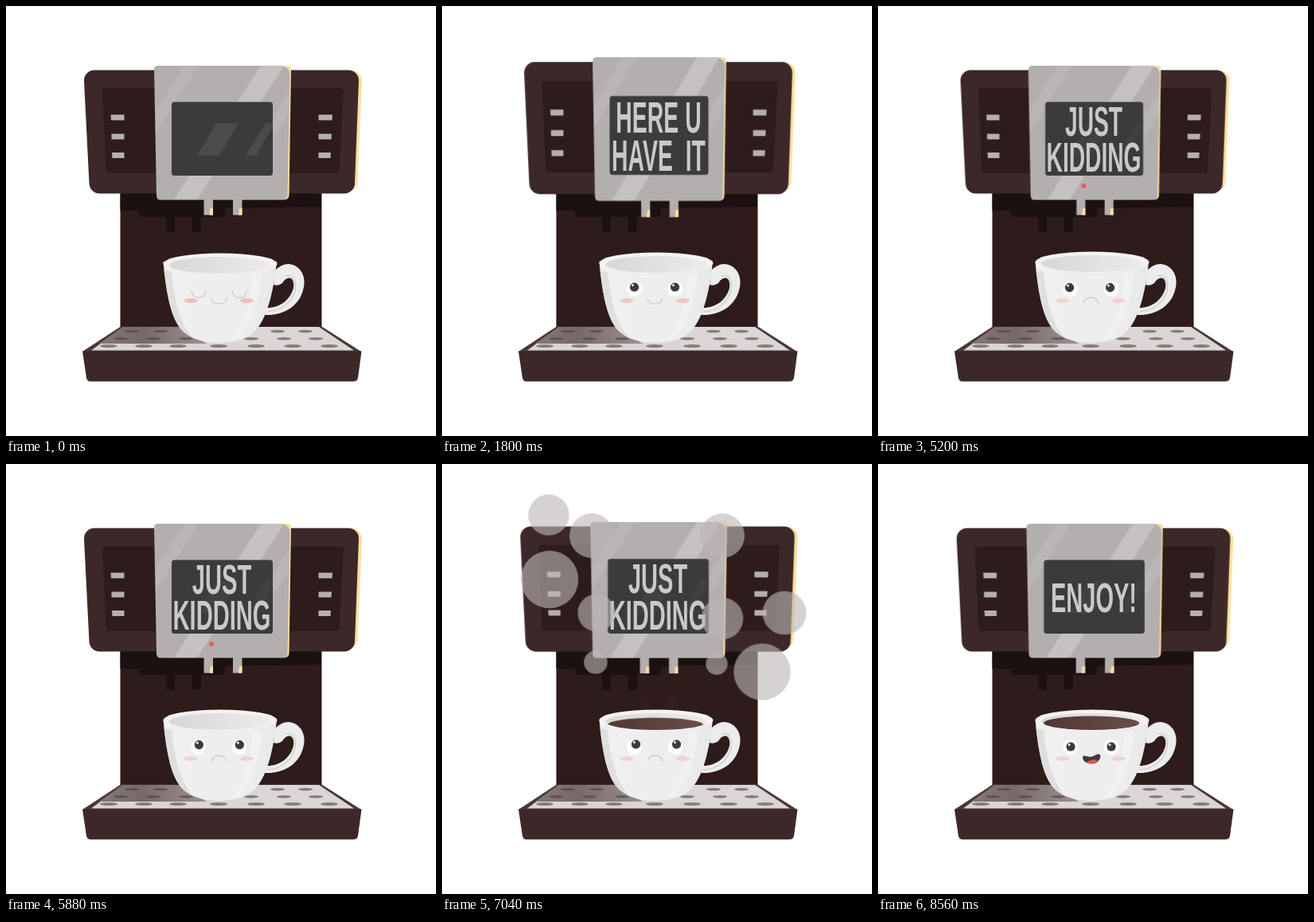
Write an HTML page without scripts that moves like this. It is 540 px wide and 540 px high and loops after 8640 ms.

```html
<!DOCTYPE html>
<html lang="en">
<head>
<meta charset="utf-8">
<title>Coffee machine</title>
<style>
html, body { margin: 0; width: 100%; height: 100%; overflow: hidden; background: #fff; }
svg { display: block; width: 100%; height: 100%; }

.anim, .cut { animation: 8.64s ease-in-out infinite; }
.cut { animation-timing-function: step-end; }
.own { transform-box: fill-box; transform-origin: center; }

.text { font: bold 52px "Liberation Sans", Arial, sans-serif; fill: #c9c9c9; text-anchor: middle; }
.line { fill: none; stroke: #cfcfcf; stroke-width: 1.5; stroke-linecap: round; }
.key { fill: #b5b0af; }
.metal { fill: #b3afae; }
.gold { fill: #ffdf9e; }
.shine { fill: #c5c1c0; }
.faint { opacity: .4; }
.dark { fill: #2d1c1b; }
.brown { fill: #3c2829; }
.ink { fill: #3b3b3b; }
.red { fill: #e6544e; }

#head { transform-origin: 272px 226px; animation-name: head; }
@keyframes head {
  0%, 1.85%, 11.5% { transform: none; }
  6.8% { transform: scale(.97, 1); }
  14% { transform: scale(.985, 1); }
  18.3% { transform: translateX(1px) scale(.972, 1.085); }
  20.83% { transform: translateX(1px) scale(.976, 1.071); }
  25.5% { transform: none; }
  29% { transform: scale(.975, 1); }
  32.4% { transform: scale(.994, 1); }
  36%, 52.6% { transform: none; }
  60.19% { transform: scale(.968, 1); }
  67%, 73.1% { transform: none; }
  75.46% { transform: translateX(1px) scale(.971, 1.22); }
  76.6% { transform: translateX(1px) scale(.97, 1.235); }
  82.5% { transform: none; }
  87.04%, 99.07% { transform: scale(.996, 1); }
  100% { transform: none; }
}

#here { animation-name: here; }
@keyframes here { 0%, 53.2% { opacity: 0 } 13.4%, 53.1% { opacity: 1 } }
#just { animation-name: just; }
@keyframes just { 0%, 82.4% { opacity: 0 } 53.2% { opacity: 1 } }
#enjoy { animation-name: enjoy; }
@keyframes enjoy { 0% { opacity: 0 } 82.4% { opacity: 1 } }
#glare { animation-name: glare; }
@keyframes glare { 0% { opacity: 1 } 13.4% { opacity: .15 } 53.2% { opacity: .4 } }
#lamp { animation-name: lamp; }
@keyframes lamp { 0%, 62.5%, 71.8% { opacity: 0 } 57.9%, 67.1% { opacity: 1 } }

#asleep { animation-name: asleep; }
@keyframes asleep { 0% { opacity: 1 } 6.5% { opacity: 0 } }
#awake { animation-name: awake; }
@keyframes awake { 0% { opacity: 0 } 6.5% { opacity: 1 } }
#smile { animation-name: smile; }
@keyframes smile { 0% { opacity: 1 } 33.6% { opacity: 0 } }
#worry { animation-name: worry; }
@keyframes worry { 0%, 45% { opacity: 0 } 33.6% { opacity: 1 } }
#frown { animation-name: frown; }
@keyframes frown { 0%, 83% { opacity: 0 } 45% { opacity: 1 } }
#grin { animation-name: grin; }
@keyframes grin { 0% { opacity: 0 } 83% { opacity: 1 } }
#cheeks { animation-name: cheeks; }
@keyframes cheeks { 0%, 2% { opacity: 1 } 21% { opacity: .8 } 36%, 99.9% { opacity: .55 } }

#pupils { animation-name: look; }
@keyframes look {
  0%, 22% { transform: none; }
  36%, 52% { transform: translate(1px, 0); }
  58%, 63% { transform: translate(-1px, .5px); }
  72%, 89% { transform: translate(2px, -1px); }
  95%, 100% { transform: translate(.5px, 2px); }
}
.pupil { animation-name: widen; }
@keyframes widen { 0%, 90% { transform: none; } 95%, 100% { transform: scale(1.42); } }
.spark { animation-name: spark; }
@keyframes spark { 0%, 90% { opacity: 0 } 95%, 100% { opacity: 1 } }

#rim { animation-name: rim; }
@keyframes rim { 0%, 2% { transform: translateY(2px); } 21% { transform: translateY(1px); } 36%, 99.9% { transform: none; } }
#coffee { animation-name: fill; }
@keyframes fill { 0%, 77% { transform: translateY(16px); opacity: 0; } 77.1% { opacity: 1; } 83%, 99.99% { transform: none; opacity: 1; } }
#steam { animation-name: steam; }
@keyframes steam { 0%, 83% { opacity: 0 } 87%, 90% { opacity: .5 } 98%, 100% { opacity: 0 } }

#drips { transform-origin: 272px 266px; animation-name: drips; }
@keyframes drips {
  0%, 73.5% { transform: scaleY(0); opacity: 0; }
  74%, 79% { opacity: 1; }
  75.46%, 78% { transform: none; }
  82%, 100% { transform: translateY(24px); opacity: 0; }
}

#smoke { animation-name: smoke; fill: #bbb7b5; }
@keyframes smoke {
  0%, 78.5% { opacity: 0; }
  80.5%, 88% { opacity: .62; transform: none; }
  93.2%, 100% { opacity: 0; transform: translateY(-17px); }
}
#smoke circle { animation-name: swell; }
@keyframes swell { 0%, 78.5% { transform: scale(.1); } 84.5%, 100% { transform: none; } }
#puff { animation-name: puff; fill: #bbb7b5; }
@keyframes puff { 0%, 24% { opacity: 0 } 29% { opacity: .4 } 36% { opacity: .04 } 40%, 100% { opacity: 0 } }
</style>
</head>
<body>
<svg viewBox="0 0 540 540">
  <defs>
    <linearGradient id="trayShade">
      <stop offset="0" stop-color="#857877"/>
      <stop offset=".4" stop-color="#776968"/>
      <stop offset="1" stop-color="#9d9291"/>
    </linearGradient>
    <linearGradient id="china">
      <stop offset="0" stop-color="#f1f0f1"/>
      <stop offset=".7" stop-color="#ededed"/>
      <stop offset="1" stop-color="#e8e8e8"/>
    </linearGradient>
    <linearGradient id="inside">
      <stop offset="0" stop-color="#d8d7d8"/>
      <stop offset="1" stop-color="#eceaeb"/>
    </linearGradient>
    <linearGradient id="brew">
      <stop offset="0" stop-color="#503836"/>
      <stop offset="1" stop-color="#694d4a"/>
    </linearGradient>
    <clipPath id="bowl"><ellipse cx="269" cy="323.5" rx="64" ry="10.5"/></clipPath>
    <clipPath id="surface"><ellipse cx="268" cy="325.5" rx="60" ry="9"/></clipPath>
    <ellipse id="hole" rx="9" ry="1.8"/>
    <ellipse id="wideHole" rx="11" ry="2"/>
    <g id="spout">
      <path class="metal" d="M0 242H11.5V262.500H0Z"/>
      <path class="gold" d="M8 254H11.5V262.500H7Z"/>
    </g>
    <path id="lid" class="line" d="M-9 -4.5Q-8 4.5 0 4.5T9 -4.5"/>
    <g id="eyeball">
      <g class="pupil anim">
        <circle class="ink" r="5.6"/>
        <circle cx="-2" cy="-2.4" r="1.5" fill="#fff"/>
        <g class="spark anim" fill="#fff">
          <circle cx="2.4" cy="2.6" r=".8"/>
          <circle cx="3.6" cy="-.8" r=".6"/>
          <circle cx="-1" cy="3.4" r=".5"/>
        </g>
      </g>
    </g>
  </defs>

  <!-- Body and tray -->
  <path class="dark" d="M143.500 230H396.500V403H143.500Z"/>
  <path fill="#1a1110" d="M143.500 234H396V252L275 254V265H245V283.500H234V265H212V283.500H201V265H167V257H143.500Z"/>
  <path fill="#4a3736" d="M144 402.500H396.500L446 434H96Z"/>
  <path fill="#dad6d5" d="M147 403H393L437 432.500H107Z"/>
  <path fill="url(#trayShade)" d="M147 403H222L252 424H117Z"/>
  <g fill="#4b4341" opacity=".6">
    <use href="#hole" x="158" y="408.500"/><use href="#hole" x="194" y="408.500"/>
    <use href="#hole" x="341" y="408.500"/><use href="#hole" x="376" y="408.500"/>
    <use href="#hole" x="144" y="417.700"/><use href="#hole" x="185" y="417.700"/>
    <use href="#hole" x="226" y="417.700"/><use href="#hole" x="308" y="417.700"/>
    <use href="#hole" x="349" y="417.700"/><use href="#hole" x="389" y="417.700"/>
    <use href="#wideHole" x="129" y="427"/><use href="#wideHole" x="173" y="427"/>
    <use href="#wideHole" x="216" y="427"/><use href="#wideHole" x="267" y="427"/>
    <use href="#wideHole" x="314" y="427"/><use href="#wideHole" x="360" y="427"/>
    <use href="#wideHole" x="406" y="427"/>
  </g>
  <path class="brown" d="M96 433.500H446.500L442 467Q441 471.500 436 471.500H106Q102 471.500 101 467Z"/>

  <g id="drips" class="anim">
    <path fill="#4d3534" d="M250 266H259V290H250ZM287 266H298V290H287Z"/>
    <g fill="#7d7674">
      <circle cx="256" cy="276" r="5"/><circle cx="254.500" cy="283" r="6"/><circle cx="255" cy="288" r="4"/>
      <circle cx="291" cy="274" r="6"/><circle cx="285" cy="282" r="6"/><circle cx="286" cy="288" r="4.500"/>
    </g>
  </g>

  <!-- Head -->
  <g id="head" class="anim">
    <path class="gold" d="M430 81H434A13 13 0 0 1 447 95L441.500 222Q440 230 432 232Z"/>
    <path class="brown" d="M111 80.500H430A13 13 0 0 1 443 94L438 223A13 13 0 0 1 425 235.500H117A13 13 0 0 1 104.500 223L98 94A13 13 0 0 1 111 80.500Z"/>
    <path class="dark" d="M125 103H420Q424 103 424 107L418.500 206Q418 210 414 210H130Q126 210 125.500 206L121 107Q121 103 125 103Z"/>
    <path class="key" d="M131.500 136.500H148.500V143.500H132ZM132.500 160.500H148.500V167.500H132.500ZM133 184H148.500V191H133.500ZM392.500 136.500H410L409.500 143.500H392.500ZM392.500 160.500H409L408.500 167.500H392.500ZM392.500 184H408L407.500 191H392.500Z"/>
    <use href="#spout" x="248.500"/>
    <use href="#spout" x="285"/>
    <path class="gold" d="M340 75H353Q358 75 358 80L355.500 238Q355 243 350 243H340Z"/>
    <path class="metal" d="M191 75H344Q356.500 76 356.500 86L353.500 239Q353 243.500 349 243.500H194Q189 243.500 189 238L186 80Q186 75 191 75Z"/>
    <path class="shine" d="M320 75H344Q347 75 348 77L240 243H211Z"/>
    <path class="shine faint" d="M224 75H242L188 159V131ZM356 107V133L336 166V139Z"/>
    <rect class="ink" x="208" y="120.500" width="127" height="92.500" rx="3.500"/>
    <path id="glare" class="cut" fill="#4b4b4b" d="M264 147H292L268 188H240ZM326 147H335V152L314 188H301Z"/>
    <circle id="lamp" class="cut" cx="258" cy="226" r="3" fill="#ee5a56"/>
    <g class="text">
      <g id="here" class="cut">
        <text transform="translate(271 163) scale(.56 1)">HERE U</text>
        <text transform="translate(271 208) scale(.56 1)">HAVE&nbsp;&nbsp;IT</text>
      </g>
      <g id="just" class="cut">
        <text transform="translate(271 163) scale(.56 1)">JUST</text>
        <text transform="translate(271 208) scale(.56 1)">KIDDING</text>
      </g>
      <g id="enjoy" class="cut">
        <text transform="translate(271 186) scale(.56 1)">ENJOY!</text>
      </g>
    </g>
  </g>

  <g id="puff" class="anim">
    <circle cx="181" cy="197" r="14"/><circle cx="183" cy="215" r="15"/>
    <circle cx="365" cy="214" r="14"/><circle cx="346" cy="236" r="18"/>
  </g>
  <g id="smoke" class="anim">
    <circle class="anim own" cx="134" cy="64" r="47"/>
    <circle class="anim own" cx="188" cy="90" r="51"/>
    <circle class="anim own" cx="135" cy="145" r="66"/>
    <circle class="anim own" cx="194" cy="187" r="43"/>
    <circle class="anim own" cx="193" cy="249" r="27"/>
    <circle class="anim own" cx="352" cy="90" r="51"/>
    <circle class="anim own" cx="352" cy="194" r="48"/>
    <circle class="anim own" cx="430" cy="187" r="50"/>
    <circle class="anim own" cx="402" cy="261" r="65"/>
    <circle class="anim own" cx="345" cy="251" r="25"/>
  </g>

  <!-- Cup -->
  <path fill="#ececec" d="M338 332Q349 321 360 325C374 330 377 345 373 357C368 376 350 389 325 388L328 379C344 379 357 369 361 354C363 341 354 337 347 348Q342 352 336 350Z"/>
  <path class="line" d="M329 384C347 383 360 371 363 356C365 343 359 337 352 339"/>
  <path fill="url(#china)" d="M197.500 321C201 360 207 396 224 410Q240 423 268 423Q300 422 313 408C330 390 337 350 340 321Z"/>
  <path fill="#dfdfdf" d="M198.500 332C203 366 208 396 224 410L236 418C218 400 211 366 208 334Z"/>
  <path fill="#f1f1f1" d="M309 336H322C318 366 310 396 294 416L284 420C301 396 307 366 309 336Z"/>
  <g id="rim" class="anim">
    <ellipse cx="269" cy="321.700" rx="71.500" ry="13.200" fill="#f4f2f3"/>
    <ellipse cx="269" cy="323.500" rx="64" ry="10.500" fill="url(#inside)"/>
    <g clip-path="url(#bowl)">
      <g id="coffee" class="anim">
        <ellipse cx="268" cy="325.500" rx="60" ry="9" fill="url(#brew)"/>
        <g clip-path="url(#surface)">
          <path id="steam" class="anim" fill="#dedbda" d="M233 336Q231 318.500 248 318.500H296Q312 318.500 310 336Z"/>
        </g>
      </g>
    </g>
  </g>

  <!-- Face -->
  <g id="cheeks" class="anim" fill="#efbeb6">
    <ellipse cx="232" cy="370" rx="8.500" ry="3"/>
    <ellipse cx="302.500" cy="370" rx="8.500" ry="3"/>
  </g>
  <g id="asleep" class="cut">
    <use href="#lid" x="242" y="362"/>
    <use href="#lid" x="293" y="362"/>
  </g>
  <g id="awake" class="cut">
    <circle cx="241.500" cy="355.500" r="9.500" fill="#fff"/>
    <circle cx="293" cy="355.500" r="9.500" fill="#fff"/>
    <g id="pupils" class="anim">
      <use href="#eyeball" x="241.500" y="353"/>
      <use href="#eyeball" x="292.500" y="353"/>
    </g>
  </g>
  <path id="smile" class="line cut" d="M258 367Q259 374 267.500 374T277 367"/>
  <g id="worry" class="cut">
    <path class="ink" d="M258 375Q260 367 268 367Q277 368 278.500 375Q277 377 274 376Q266 374 262 377Q258 378 258 375Z"/>
    <path class="red" d="M263 376Q265 371.500 271 372Q277 372.500 277 376Q269 374 263 376Z"/>
  </g>
  <path id="frown" class="line cut" d="M258.500 373Q260 366 267.500 366T277 373"/>
  <g id="grin" class="cut">
    <path class="ink" d="M257 369Q257 365 262 367Q268 369 273 365.500Q279 362.500 279.500 367Q278 376 268 376.500Q258 376 257 369Z"/>
    <path class="red" d="M262 375Q265 371.500 270 371.500Q274 371 276 372Q273 376 268 376.500Q264 376.500 262 375Z"/>
  </g>
</svg>
</body>
</html>
```
